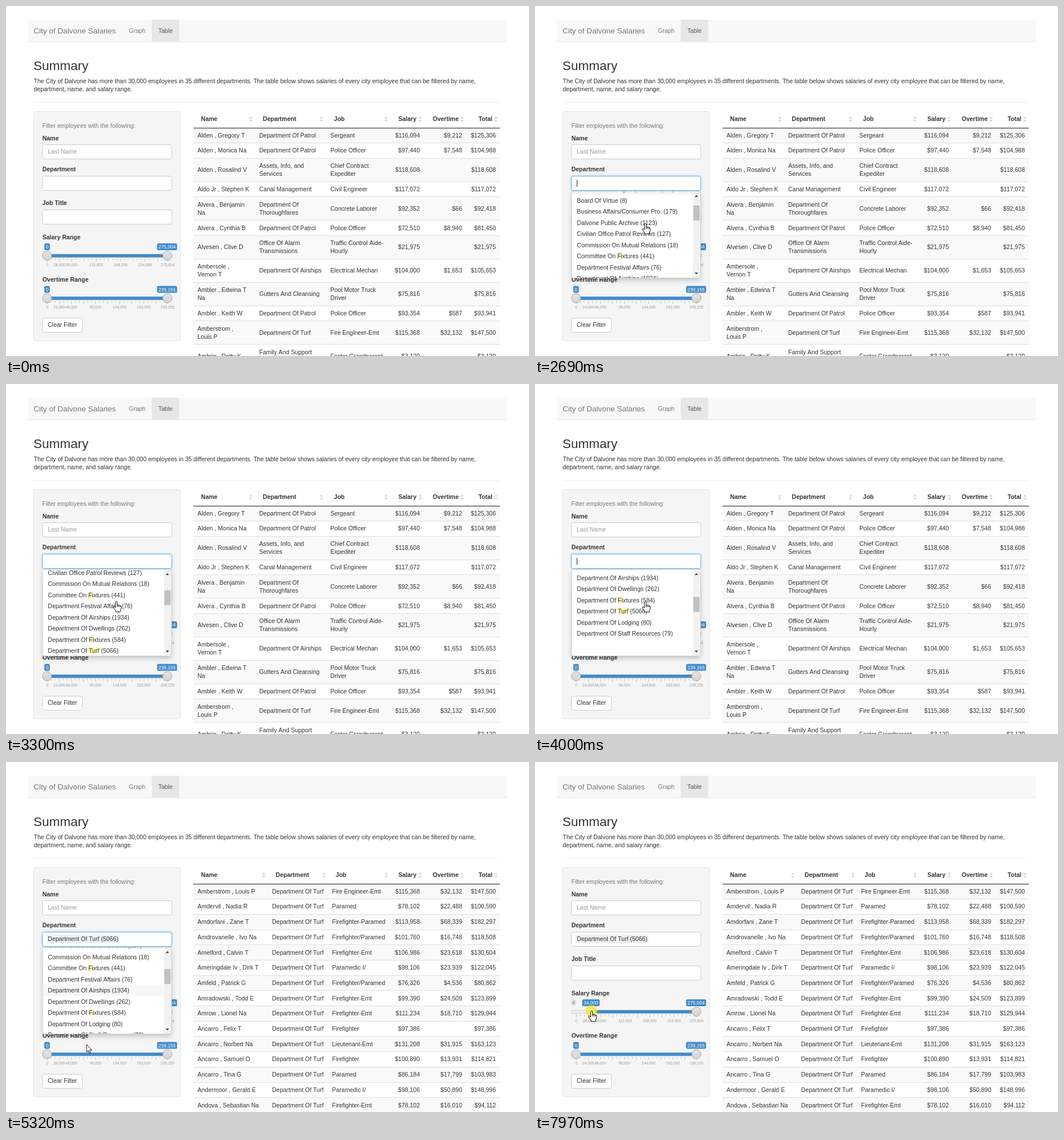
Animation of 915x612 px, one loop 8 s. Source, as an HTML page with a canvas:

```html
<!DOCTYPE html>
<html lang="en">
<head>
<meta charset="utf-8">
<title>Salary table</title>
<style>
html, body { margin: 0; width: 100%; height: 100%; overflow: hidden; background: #fff; }
canvas { display: block; }
</style>
</head>
<body>
<canvas id="stage" width="915" height="612"></canvas>
<script>
const ctx = document.getElementById("stage").getContext("2d");
const LOOP = 8000, PITCH = 19.5, SIZE = 10.5;
const BLUE = "#428bca", INK = "#333";

// name | department | job | salary | overtime | total, "~" breaks a line
const allRows = `Alden , Gregory T|Department Of Patrol|Sergeant|$116,094|$9,212|$125,306
Alden , Monica Na|Department Of Patrol|Police Officer|$97,440|$7,548|$104,988
Alden , Rosalind V|Assets, Info, and~Services|Chief Contract~Expediter|$118,608||$118,608
Aldo Jr , Stephen K|Canal Management|Civil Engineer|$117,072||$117,072
Alvera , Benjamin~Na|Department Of~Thoroughfares|Concrete Laborer|$92,352|$66|$92,418
Alvera , Cynthia B|Department Of Patrol|Police Officer|$72,510|$8,940|$81,450
Alvesen , Clive D|Office Of Alarm~Transmissions|Traffic Control Aide-~Hourly|$21,975||$21,975
Ambersole ,~Vernon T|Department Of Airships|Electrical Mechan|$104,000|$1,653|$105,653
Ambler , Edwina T~Na|Gutters And Cleansing|Pool Motor Truck~Driver|$75,816||$75,816
Ambler , Keith W|Department Of Patrol|Police Officer|$93,354|$587|$93,941
Amberstrom ,~Louis P|Department Of Turf|Fire Engineer-Emt|$115,368|$32,132|$147,500
Ambrin , Dotty K|Family And Support~Services|Foster Grandparent|$3,120||$3,120`;

const pickedRows = `Amberstrom , Louis P|Fire Engineer-Emt|$115,368|$32,132|$147,500
Amdervil , Nadia R|Paramed|$78,102|$22,488|$100,590
Amdorfani , Zane T|Firefighter-Paramed|$113,958|$68,339|$182,297
Amdrovanelle , Ivo Na|Firefighter/Paramed|$101,760|$16,748|$118,508
Amelford , Calvin T|Firefighter-Emt|$106,986|$23,618|$130,604
Ameringdale Iv , Dirk T|Paramedic I/|$98,106|$23,939|$122,045
Amfeld , Patrick G|Firefighter/Paramed|$76,326|$4,536|$80,862
Amradowski , Todd E|Firefighter-Emt|$99,390|$24,509|$123,899
Amrow , Lionel Na|Firefighter-Emt|$111,234|$18,710|$129,944
Ancarro , Felix T|Firefighter|$97,386||$97,386
Ancarro , Norbert Na|Lieutenant-Emt|$131,208|$31,915|$163,123
Ancarro , Samuel O|Firefighter|$100,890|$13,931|$114,821
Ancarro , Tina G|Paramed|$86,184|$17,799|$103,983
Andermoor , Gerald E|Paramedic I/|$98,106|$50,890|$148,996
Andova , Sebastian Na|Firefighter-Emt|$78,102|$16,010|$94,112`;

const split = s => s.split("\n").map(r => r.split("|"));
const fullTable = { rows: split(allRows), left: [335, 443, 567.5], icons: [428, 552] };
const pickedTable = {
  rows: split(pickedRows).map(([name, ...rest]) => [name, "Department Of Turf", ...rest]),
  left: [335, 465.5, 570.5], icons: [451, 556]
};

const PICK = "Department Of Turf (5066)";
// "*" encloses the marked letters
const options = [
  "Animal Aid & Shelters (75)", "Assets, Info, and Services (1100)",
  "Board Of Balloting Supervisors (112)", "Board Of Virtue (8)",
  "Business Affairs/Consumer Pro. (179)", "Dalvone Public Archive (1123)",
  "Civilian Office Patrol Reviews (127)", "Commission On Mutual Relations (18)",
  "Committee On *Fi*xtures (441)", "Department Festival Affairs (76)",
  "Department Of Airships (1934)", "Department Of Dwellings (262)",
  "Department Of *Fi*xtures (584)", "Department Of *Turf* (5066)",
  "Department Of Lodging (80)", "Department Of Staff Resources (79)"
];

const pointerPath = [
  [480, 845, 566], [560, 306, 447], [740, 306, 447], [1530, 79, 309], [1890, 79, 309],
  [1930, 196, 340], [2110, 193, 380], [3980, 193, 380], [4200, 192, 393], [4990, 192, 393],
  [5350, 140, 496], [6600, 140, 496], [7060, 73, 432], [7760, 73, 432], [7970, 99, 435]
];
const scrollPath = [[2460, 0], [2690, 56.5], [3300, 125], [3690, 194], [4370, 194], [4530, 133.5]];
const fadePath = [[4370, 1], [4530, 0.92], [4990, 0.92], [5350, 1]];

const smooth = u => u * u * (3 - 2 * u);

function along(path, t, ease = u => u) {
  if (t <= path[0][0]) return path[0].slice(1);
  for (let i = 1; i < path.length; i++) {
    const [a, ...p] = path[i - 1], [b, ...q] = path[i];
    if (t < b) {
      const u = ease((t - a) / (b - a));
      return p.map((v, k) => v + (q[k] - v) * u);
    }
  }
  return path[path.length - 1].slice(1);
}

function setFont(size, bold) {
  ctx.font = `${bold ? "bold " : ""}${size}px "Liberation Sans", Arial, sans-serif`;
}

// y is the middle of the capitals; baselines sit on whole pixels
function text(s, x, y, { size = SIZE, color = INK, bold = false, align = "left" } = {}) {
  setFont(size, bold);
  ctx.fillStyle = color;
  ctx.textAlign = align;
  ctx.fillText(s, x, Math.round(y + size * 0.36));
}

function rect(x, y, w, h, color) {
  ctx.fillStyle = color;
  ctx.fillRect(x, y, w, h);
}

function box(x, y, w, h, r, fill, stroke) {
  ctx.beginPath();
  ctx.roundRect(x, y, w, h, r);
  ctx.fillStyle = fill;
  ctx.fill();
  if (stroke) {
    ctx.strokeStyle = stroke;
    ctx.lineWidth = 1;
    ctx.stroke();
  }
}

function triangle(x, y, w, h, color) {
  ctx.beginPath();
  ctx.moveTo(x - w / 2, y);
  ctx.lineTo(x + w / 2, y);
  ctx.lineTo(x, y + h);
  ctx.fillStyle = color;
  ctx.fill();
}

function drawPage() {
  rect(38, 24, 838, 38, "#f8f8f8");
  rect(255, 24, 48, 38, "#e7e7e7");
  rect(38, 62, 838, 1, "#e7e7e7");
  text("City of Dalvone Salaries", 48.3, 43.5, { size: 13.5, color: "#777" });
  text("Graph", 215, 43, { color: "#777" });
  text("Table", 266.5, 43, { color: "#555" });
  text("Summary", 48, 104, { size: 22.5 });
  text("The City of Dalvone has more than 30,000 employees in 35 different departments. " +
    "The table below shows salaries of every city employee that can be filtered by name,", 48.5, 131);
  text("department, name, and salary range.", 48.5, 145);
  rect(49, 168, 815, 1, "#eee");
}

function drawTable({ rows, left, icons }) {
  const heads = ["Name", "Department", "Job", "Salary", "Overtime", "Total"];
  const right = [724, 798, 857];
  const marks = [...icons, 665, 724.5, 798, 857];
  heads.forEach((h, i) => {
    if (i < 3) text(h, left[i] + 6.3, 197.5, { bold: true });
    else text(h, right[i - 3] - 6, 197.5, { bold: true, align: "right" });
    triangle(marks[i], 197, 6, -4, "#d8d8d8");
    triangle(marks[i], 199, 6, 4, "#d8d8d8");
  });
  let y = 212.4;
  rows.forEach((row, n) => {
    const h = row.some(c => c.includes("~")) ? 40.9 : 26.7;
    const top = Math.round(y), end = Math.round(y + h);
    if (n % 2 === 0) rect(328, top, 536, end - top, "#f9f9f9");
    if (n) rect(328, top, 536, 1, "#ddd");
    row.forEach((cell, i) => {
      const lines = cell.split("~");
      lines.forEach((s, k) => {
        const ly = Math.round(y + h / 2 + (k - (lines.length - 1) / 2) * 14);
        if (i < 3) text(s, left[i], ly);
        else text(s, right[i - 3], ly, { align: "right" });
      });
    });
    y += h;
  });
  rect(328, 213, 536, 1, "#222");
}

function drawField(y, focused) {
  const place = [63.5, y + 0.5, 226.5, 25, 3];
  if (focused) {
    ctx.save();
    ctx.shadowColor = "rgba(102,175,233,.6)";
    ctx.shadowBlur = 5;
    box(...place, "#fff");
    ctx.restore();
  }
  box(...place, "#fff", focused ? "#66afe9" : "#ccc");
}

function tag(s, x, y) {
  setFont(8.3);
  const w = ctx.measureText(s).width + 5;
  box(x - w / 2, y, w, 12, 2.5, BLUE);
  text(s, x, y + 6.2, { size: 8.3, color: "#fff", align: "center" });
  return x - w / 2;
}

function handle(x, y) {
  const g = ctx.createLinearGradient(0, y - 8, 0, y + 8);
  g.addColorStop(0, "#e4e4e4");
  g.addColorStop(1, "#d4d4d4");
  box(x - 8, y - 8, 16, 16, 8, g, "#a8a8a8");
}

function drawSlider(y, max, step, value) {
  const pos = v => 71.8 + 210.5 * v / max;
  const num = v => v.toLocaleString("en-US");
  box(64, y - 2.5, 226, 5.5, 2.5, "#efefef", "#ccc");
  rect(pos(value), y - 2.8, pos(max) - pos(value), 5.6, BLUE);

  for (let v = 0, i = 0; v < max; v += step / 3, i++) {
    rect(pos(v), y + 5, 0.7, i % 3 ? 2.5 : 5, "#aaa");
  }
  rect(pos(max), y + 5, 0.7, 5, "#aaa");
  for (const v of [0, 1, 2, 4, 6, 8].map(k => k * step).concat(max)) {
    text(num(v), pos(v) + 0.2, y + 16, { size: 6.65, color: "#999", align: "center" });
  }
  const edge = tag(num(value), pos(value), y - 21.6);
  if (edge > 74) {
    box(63.5, y - 21.6, 8.5, 11, 2.5, "#e0e0e0");
    text("0", 67.7, y - 16, { size: 7.5, color: "#666", align: "center" });
  }
  tag(num(max), pos(max) - 0.5, y - 21.6);
  handle(pos(value), y);
  handle(pos(max), y);
}

function drawOption(label, x, y) {
  label.split("*").forEach((part, i) => {
    setFont(SIZE);
    const w = ctx.measureText(part).width;
    if (i % 2) rect(x, y - 6, w, 12, "rgba(255,237,40,.35)");
    text(part, x, y);
    x += w;
  });
}

function drawDropdown(t, picked) {
  ctx.save();
  ctx.shadowColor = "rgba(0,0,0,.2)";
  ctx.shadowBlur = 9;
  ctx.shadowOffsetY = 4;
  box(64, 324, 225.5, 151.5, [0, 0, 3, 3], "#fff");
  ctx.restore();
  box(64, 324, 225.5, 151.5, [0, 0, 3, 3], "#fff", "#d0d0d0");

  const [scroll] = along(scrollPath, t);
  const active = t < 1960 ? 0 : t < 2040 ? 1 : t < 4100 ? 2 : picked ? 10 : 13;
  const list = picked ? options.filter((_, i) => i !== 13) : options;
  ctx.save();
  ctx.beginPath();
  ctx.rect(64.5, 324.5, 212, 150.5);
  ctx.clip();
  list.forEach((label, i) => {
    const y = 337.8 + i * PITCH - scroll;
    if (i === active) rect(64, y - 10, 212, PITCH, "#f5f7f8");
    drawOption(label, 73.3, Math.round(y));
  });
  ctx.restore();

  rect(276.5, 325, 12, 150, "#f1f1f1");
  rect(277, 339 + scroll * 0.173, 11, 26, "#c1c1c1");
  triangle(282.3, 334, 6, -3.5, scroll > 0 ? "#444" : "#a3a3a3");
  triangle(282.3, 466, 6, 3.5, "#444");
}

function drawPanel(t) {
  const open = t >= 1560 && t < 5760, picked = t >= 4380;
  box(48.5, 184.5, 256.5, 401, 3, "#f5f5f5", "#e3e3e3");
  text("Filter employees with the following:", 63.5, 209.3, { color: "#777" });
  const labels = [["Name", 231], ["Department", 285.3], ["Job Title", 344.3],
    ["Salary Range", 404], ["Overtime Range", 478.2]];
  for (const [s, y] of labels) text(s, 63.7, y, { bold: true });
  drawField(242, false);
  text("Last Name", 73, 254.5, { color: "#999" });
  drawField(356, false);

  const drag = Math.max(0, Math.min(1, (t - 7760) / 210));
  drawSlider(436.7, 275004, 28000, Math.round(34 * smooth(drag)) * 1000);
  drawSlider(511, 239155, 24000, 0);
  box(63.5, 546, 70, 24.5, 3, "#fff", "#ccc");
  text("Clear Filter", 73, 557.7);

  if (open) drawDropdown(t, picked);
  drawField(297, open);
  let caretX = 73;
  if (picked) {
    setFont(SIZE);
    const w = ctx.measureText(PICK).width;
    box(71, 302, w + 4.5, 15, 2, "#efefef");
    text(PICK, 73.3, 309.5);
    caretX = Math.round(75 + w + 2.5);
  }
  const blinkOn = Math.floor((t - 1560) / 530) % 2 === 0;
  if (open && blinkOn) rect(caretX, 304, 1, 12, "#222");
}

const shapes = {
  arrow: new Path2D("M0 0V13.3L3 10.6L5 15.3L7.1 14.4L5.1 9.9H9.3Z"),
  hand: new Path2D("M-1.5 1Q0-.9 1.5 1V6.4Q3 5.4 4 6.8Q5.6 5.9 6.5 7.5Q8.5 7 8.7 9.4" +
    "L8.4 13L7 16V18.5H-1V16.5L-4 12.6Q-6 9.5-4.5 9.1Q-3 9-1.5 11Z"),
  folds: new Path2D("M1.5 6.4V10M4 6.8V10M6.5 7.5V10"),
  beam: new Path2D("M-2.5-6.5H-.8L0-6L.8-6.5H2.5M0-6V6M-2.5 6.5H-.8L0 6L.8 6.5H2.5")
};

function drawPointer(t) {
  if (t < 480) return;
  const [x, y] = along(pointerPath, t, smooth);
  const open = t >= 1560 && t < 5760;
  const inX = x > 64 && x < 290;
  const onField = inX && [242, 297, 356].some(f => y > f && y < f + 25);
  const onList = open && inX && y > 324 && y < 475;
  const onHandle = t > 6600 && Math.hypot(x - 72, y - 436.5) < 9 || t > 7060;

  if (t >= 7520) {
    ctx.beginPath();
    ctx.arc(x, y + 0.5, 10.3, 0, 2 * Math.PI);
    ctx.fillStyle = "rgba(255,240,20,.65)";
    ctx.fill();
  }
  ctx.save();
  ctx.translate(x, y);
  ctx.lineWidth = 1;
  ctx.lineJoin = "round";
  ctx.strokeStyle = "#111";
  ctx.fillStyle = "#fff";
  if (onList || onHandle) {
    ctx.fill(shapes.hand);
    ctx.stroke(shapes.hand);
    ctx.stroke(shapes.folds);
  } else if (onField) {
    ctx.stroke(shapes.beam);
  } else {
    ctx.fill(shapes.arrow);
    ctx.stroke(shapes.arrow);
  }
  ctx.restore();
}

function draw(t) {
  rect(0, 0, 915, 612, "#fff");
  drawPage();
  ctx.save();
  ctx.globalAlpha = along(fadePath, t)[0];
  drawTable(t < 5010 ? fullTable : pickedTable);
  ctx.restore();
  drawPanel(t);
  drawPointer(t);
}

const start = performance.now();
function tick() {
  draw((performance.now() - start) % LOOP);
  requestAnimationFrame(tick);
}
tick();
</script>
</body>
</html>
```
